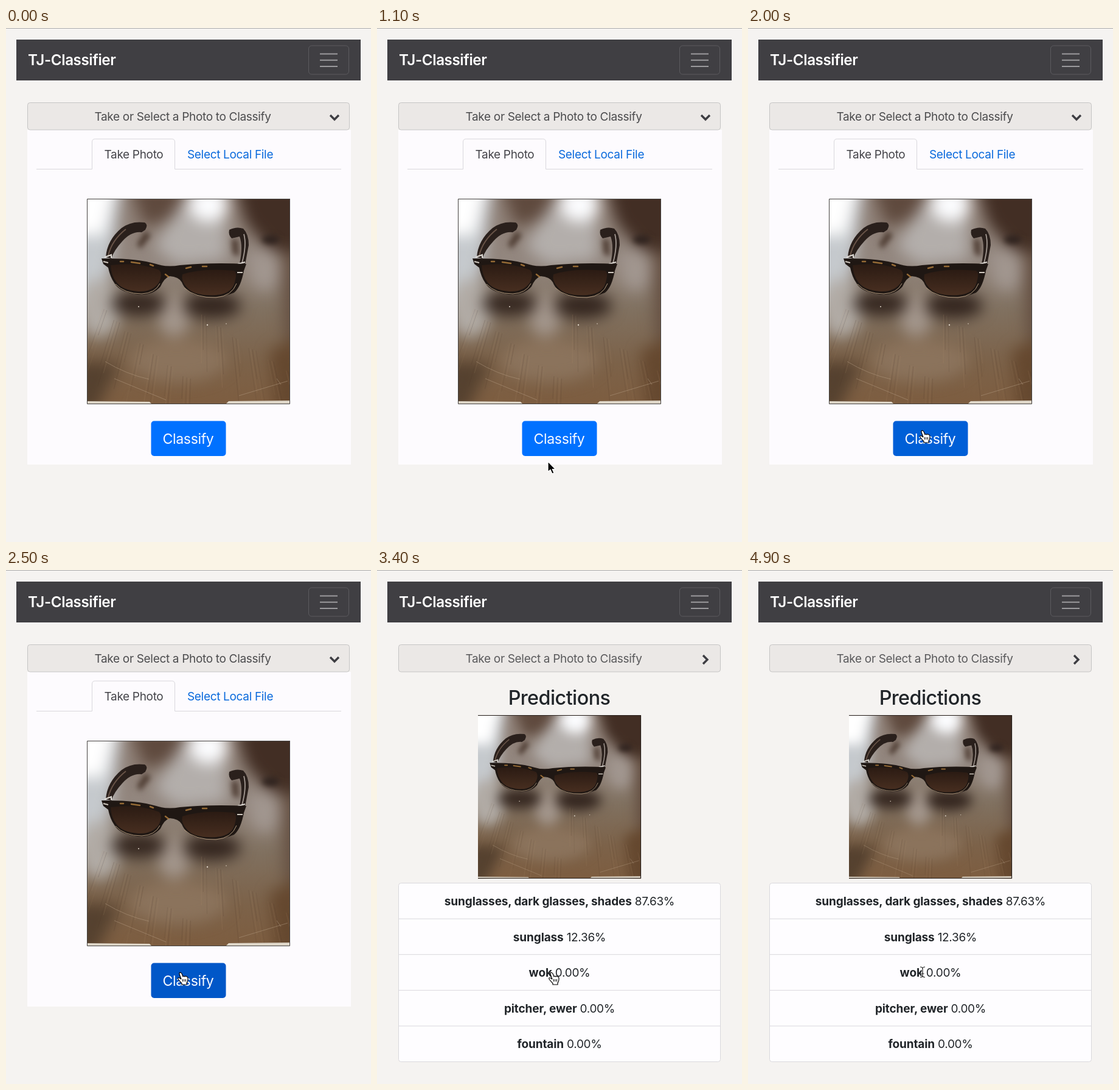
An HTML page that plays this animation: 600x843 px, repeating every 5000 ms.

```html
<!DOCTYPE html>
<html lang="en">
<head>
<meta charset="utf-8">
<title>Classifier demo</title>
<style>
html, body { margin: 0; width: 100%; height: 100%; overflow: hidden; background: #f5f3f1; }
#stage { display: block; width: 100%; height: 100%; }
text { font: 19px Inter, "Open Sans", sans-serif; letter-spacing: -.017em; fill: #212529; }
.mid { text-anchor: middle; }
.bold { font-weight: 700; letter-spacing: -.006em; }
.line { fill: none; stroke: #d9d8dc; }
.chevron { fill: none; stroke: #3d3d42; stroke-width: 3.4; }
filter { color-interpolation-filters: sRGB; }
</style>
</head>
<body>
<svg id="stage" viewBox="0 0 600 843">
  <defs>
    <linearGradient id="wood" x2="0" y2="1">
      <stop offset="0" stop-color="#8a7a70"/>
      <stop offset=".3" stop-color="#93877f"/>
      <stop offset=".55" stop-color="#80705f"/>
      <stop offset=".8" stop-color="#7c6249"/>
      <stop offset="1" stop-color="#7d5d40"/>
    </linearGradient>
    <linearGradient id="lens" x2="0" y2="1">
      <stop offset="0" stop-color="#2b1b13"/>
      <stop offset="1" stop-color="#472e20"/>
    </linearGradient>
    <filter id="soft" x="-60%" y="-60%" width="220%" height="220%"><feGaussianBlur stdDeviation="12"/></filter>
    <filter id="haze" x="-60%" y="-60%" width="220%" height="220%"><feGaussianBlur stdDeviation="5"/></filter>
    <clipPath id="frame"><path d="M0 0H334V336H0z"/></clipPath>
    <clipPath id="fold"><rect id="foldBox" y="167" width="600" height="549"/></clipPath>

    <g id="photo" clip-path="url(#frame)">
      <path d="M0 0H334V336H0z" fill="url(#wood)"/>
      <g filter="url(#soft)">
        <path d="M242-30H370V95L300 85L262 40z" fill="#422e24"/>
        <path d="M70-30H165L150 30L95 45z" fill="#5f4a3e"/>
        <path d="M-30-30H60L48 60L30 165L-30 180z" fill="#c5c9cd"/>
        <path d="M-30-30H50L28 60H-30z" fill="#fff"/>
        <path d="M170-20H232L228 100L150 108L110 80z" fill="#b3aeab"/>
        <ellipse cx="200" cy="10" rx="32" ry="28" fill="#fcfdff"/>
        <ellipse cx="292" cy="115" rx="26" ry="36" fill="#a1968f"/>
        <path d="M318 85H370V260L325 230z" fill="#655042"/>
        <ellipse cx="20" cy="180" rx="36" ry="48" fill="#b1aba5"/>
        <ellipse cx="143" cy="190" rx="26" ry="36" fill="#a4978d"/>
        <ellipse cx="150" cy="265" rx="80" ry="35" fill="#8b735c"/>
        <ellipse cx="85" cy="172" rx="46" ry="20" fill="#34261f"/>
        <ellipse cx="205" cy="175" rx="48" ry="22" fill="#34261f"/>
        <path d="M-20 265L55 270L10 356H-20z" fill="#55412f"/>
        <path d="M300 250L360 220V350H310z" fill="#65482f"/>
      </g>
      <g filter="url(#haze)" fill="#4a382e">
        <path d="M96 53L105 60L88 82L82 75z"/>
        <path d="M238 65L248 67L250 95L240 90z"/>
        <ellipse cx="302" cy="67" rx="14" ry="7" fill="#2f231f"/>
      </g>
      <g id="grain" fill="none"></g>
      <path d="M30 267Q65 288 102 296M45 295L130 330M250 323L330 299M312 295L319 305" fill="none" stroke="#bda68c" stroke-width=".8" opacity=".55"/>
      <path d="M0 332L103 333L106 336H0zM229 336L233 332L334 331V336z" fill="#ded6c8"/>
      <g fill="#ddd2c5"><circle cx="85" cy="177" r="1"/><circle cx="198" cy="207" r="1.2"/><circle cx="229" cy="205" r=".8"/></g>

      <path d="M31 96Q33 68 57 48Q73 36 95 39Q101 42 96 51L90 55Q73 53 58 70Q45 84 40 98z" fill="#2a201c"/>
      <path d="M35 93Q41 68 64 50" fill="none" stroke="#695448" stroke-width="2"/>
      <path d="M251 106Q257 78 251 62L238 65Q232 59 234 51Q246 45 257 49Q266 58 266 76L260 108z" fill="#2a201c"/>
      <path d="M255 105Q263 76 258 58" fill="none" stroke="#aaa099" stroke-width="1.7"/>
      <path d="M29 96L40 92V97M248 107L260 104" fill="none" stroke="#e1ddd7" stroke-width="2"/>
      <path d="M24 98Q80 97 114 107Q132 113 153 109Q205 104 262 107L258 118Q253 145 242 154Q220 164 186 160Q163 155 156 137Q151 128 136 127Q127 130 121 144Q108 159 83 157Q53 153 45 138Q38 128 35 113L27 107z" fill="#1f1713"/>
      <path d="M39 109Q85 103 119 117Q125 124 118 138Q107 153 85 152Q57 150 48 136Q40 126 39 109z" fill="url(#lens)"/>
      <path d="M157 124Q190 113 242 118Q248 122 242 140Q236 156 212 158Q176 160 164 145Q154 134 157 124z" fill="url(#lens)"/>
      <path d="M55 103H60M73 104L87 106M104 108L109 110M129 124L134 128M163 114L171 112M190 111H197" fill="none" stroke="#bd8640" stroke-width="2.5" stroke-linecap="round" opacity=".75"/>
      <path d="M27 103L35 105M247 121H256" stroke="#d0c9c0" stroke-width="2"/>
      <path d="M47 140Q62 156 90 156Q112 155 120 139M160 146Q178 163 212 162Q238 160 246 139" fill="none" stroke="#af977c" stroke-width="1"/>
    </g>
  </defs>

  <path d="M0 0H600V843H0z" fill="#f5f3f1"/>
  <path d="M0 .5H600" stroke="#acabab"/>

  <g id="results">
    <text class="mid" x="299.5" y="221" style="font-size:32.3px;font-weight:500">Predictions</text>
    <use href="#photo" transform="translate(166 238) scale(.802 .798)"/>
    <path d="M166 238.5H433.5V505.5H166" fill="none" stroke="#241c18" stroke-width="1.2"/>
    <rect class="line" x="35.5" y="513.5" width="529" height="293" rx="4" style="fill:#fefdff"/>
    <g id="list"></g>
  </g>

  <g id="panel" clip-path="url(#fold)">
    <path d="M35 167H567V716H35z" fill="#fdfbfe"/>
    <path class="line" d="M50 231.5H141.5V187Q141.5 182 146.5 182H272.5Q277.5 182 277.5 187V231.5H551"/>
    <text x="161.5" y="214" style="fill:#434348">Take Photo</text>
    <text x="298" y="214" style="fill:#0869dc">Select Local File</text>
    <use href="#photo" x="133" y="280"/>
    <path d="M133.5 280.5H466.5V616.5H133.5z" fill="none" stroke="#454240"/>
    <rect id="button" x="238.5" y="644.5" width="123" height="57.5" rx="5"/>
    <text class="mid" x="299.5" y="682" style="font-size:23.1px;fill:#f7faff">Classify</text>
  </g>

  <rect x="35.5" y="122.5" width="529" height="44.5" rx="4" fill="#ebe8e6" stroke="#c5c4c4"/>
  <text id="title" class="mid" x="290.5" y="152">Take or Select a Photo to Classify</text>
  <path id="arrow" class="chevron"/>

  <path d="M17 19H583V86H17z" fill="#403f43"/>
  <text x="36" y="61" style="font-size:24.2px;font-weight:600;fill:#fff">TJ-Classifier</text>
  <rect x="497.5" y="29" width="66" height="47" rx="5" fill="none" stroke="#5c5b5f"/>
  <path d="M516 42.5H545M516 52.8H545M516 63H545" stroke="#9b9a9d" stroke-width="2"/>

  <g id="cursor" stroke-linejoin="round">
    <path id="pointer" d="M0 0V17L4 13.5L7 20L10 18.7L7.2 12.5H12.3z" fill="#000" stroke="#fff" stroke-width="1.2"/>
    <g id="hand" stroke="#000" stroke-width="1.2">
      <path d="M-2 1Q0-1 2 2L4 7Q5 5 7 7Q8 5 10 7Q12 7 12 10Q12 15 10 17V20H2V18Q-1 15-4 11Q-5 8-2 9L1 11L-2 3z" fill="#fff"/>
      <path d="M3.5 11V15M6 11V15M8.5 11V15" fill="none" stroke-width="1"/>
    </g>
    <g id="beam" fill="none">
      <path id="bar" d="M-4-9Q0-9 0-6Q0-9 4-9M0-7V6M-4 8Q0 8 0 5Q0 8 4 8M-2.5 2H2.5" stroke="#fff" stroke-width="3"/>
      <path d="M-4-9Q0-9 0-6Q0-9 4-9M0-7V6M-4 8Q0 8 0 5Q0 8 4 8M-2.5 2H2.5" stroke="#222" stroke-width="1.2"/>
    </g>
  </g>
</svg>
<script>
const $ = id => document.getElementById(id);
const show = (id, on) => $(id).setAttribute("display", on ? "inline" : "none");

const results = [
  ["sunglasses, dark glasses, shades", "87.63%"],
  ["sunglass", "12.36%"],
  ["wok", "0.00%"],
  ["pitcher, ewer", "0.00%"],
  ["fountain", "0.00%"]
];
$("list").innerHTML = results.map(([name, score], i) => {
  const y = 513.5 + i * 58.6;
  const rule = i ? `<path class="line" d="M36 ${y}H564"/>` : "";
  return `${rule}<text class="mid" x="300" y="${y + 36.5}"><tspan class="bold">${name}</tspan> ${score}</text>`;
}).join("");

// Wood grain fans out towards the viewer
let grain = "";
for (let i = 0; i < 60; i++) {
  const x = (i * 61.8) % 400 - 30, y = 180 + (i * 37) % 120;
  const end = y + 30 + (i * 29) % 80;
  const at = v => 190 + (x - 190) * (.45 + v / 610);
  grain += `<path d="M${at(y)} ${y}L${at(end)} ${end}" stroke="${i % 2 ? "#4a3525" : "#b2926f"}" opacity="${.1 + i % 4 * .04}"/>`;
}
$("grain").innerHTML = grain;

const path = [[400, 204, 872], [500, 214, 841], [600, 226, 815], [1100, 281, 711], [1200, 285, 674], [1300, 287, 660]];
function place(t) {
  const k = path.findIndex(p => p[0] > t);
  if (k < 0) return path[path.length - 1].slice(1);
  if (!k) return path[0].slice(1);
  const [t0, x0, y0] = path[k - 1], [t1, x1, y1] = path[k];
  const f = (t - t0) / (t1 - t0);
  return [x0 + (x1 - x0) * f, y0 + (y1 - y0) * f];
}

function draw(now) {
  const t = Math.floor(now % 5000 / 100) * 100;
  const p = Math.min(1, Math.max(0, (t - 3030) / 350));
  const height = 549 * (1 - p) ** 3 * (1 + 1.8 * p);
  const closed = p > 0;

  $("foldBox").setAttribute("height", height);
  show("panel", height > 0);
  show("results", closed);
  $("results").setAttribute("transform", `translate(0 ${height})`);
  $("arrow").setAttribute("d", closed ? "M536 140L543 147L536 154" : "M533 143L540 150L547 143");
  $("title").style.fill = closed ? "#59595b" : "#4b4b4d";
  $("button").style.fill = t < 1200 ? "#0071ff" : t < 2400 ? "#005fd7" : "#0057c8";

  $("cursor").setAttribute("transform", `translate(${place(t)})`);
  show("pointer", t >= 400 && t < 1200);
  show("hand", t >= 1200 && t < 3500);
  show("beam", t >= 3500);
  requestAnimationFrame(draw);
}
draw(0);
</script>
</body>
</html>
```
